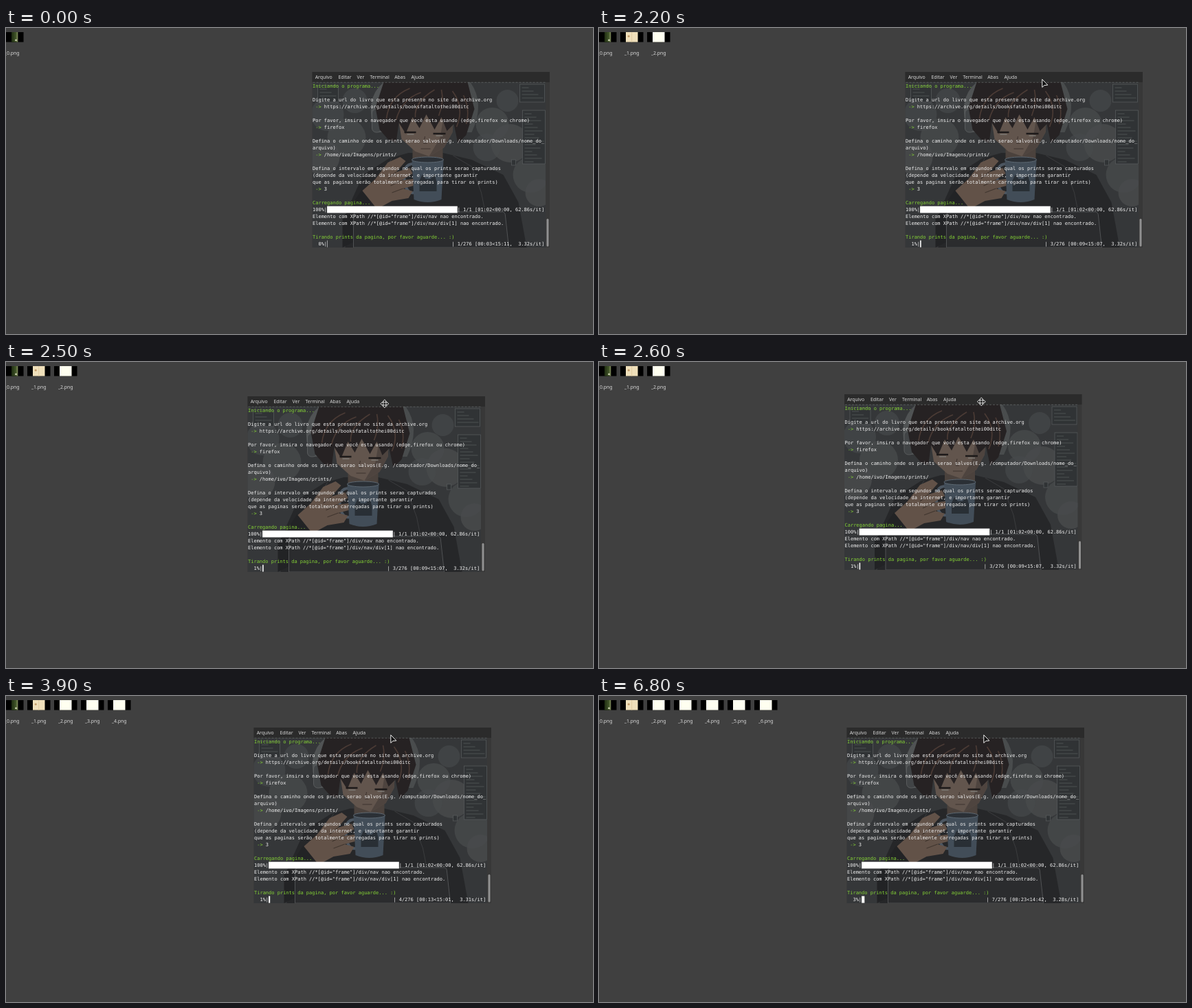
An HTML page that plays this animation: 854x446 px, repeating every 6900 ms.

```html
<!DOCTYPE html>
<html lang="pt">
<head>
<meta charset="utf-8">
<title>Terminal</title>
<style>
html, body { margin: 0; width: 100%; height: 100%; overflow: hidden; background: #404040; }
svg { display: block; width: 854px; height: 446px; }
text { white-space: pre; }
.ui { font: 6.9px "Noto Sans", "Open Sans", sans-serif; fill: #d6d6d6; }
.mono { font: 7px "DejaVu Sans Mono", monospace; fill: #f0f0f0; }
.green { fill: #85d336; }
</style>
</head>
<body>
<svg viewBox="0 0 854 446" xmlns="http://www.w3.org/2000/svg">
  <defs>
    <clipPath id="pane"><rect y="15" width="339.5" height="241"/></clipPath>
    <linearGradient id="cover"><stop stop-color="#1f2d12"/><stop offset=".7" stop-color="#43572a"/><stop offset="1" stop-color="#8a9466"/></linearGradient>
  </defs>
  <rect width="854" height="446" fill="#404040"/>
  <g id="files"></g>
  <g id="win">
    <rect width="345.5" height="256" fill="#383838"/>
    <g clip-path="url(#pane)">
      <rect y="15" width="340" height="241" fill="#353739"/>
      <g id="clouds" fill="#484b4c"></g>
      <g id="panels" fill="#303335" stroke="#55595a" stroke-width=".8"></g>
      <!-- jacket -->
      <path d="M48 256L56 190 74 150 112 126 140 118H190L232 128 278 150 300 190 312 256Z" fill="#262729"/>
      <path d="M205 122L232 138 246 176 262 256M116 126L100 150 88 198" fill="none" stroke="#3b3c3e"/>
      <!-- headphones -->
      <path d="M92 88Q74 40 104 15H116Q92 46 102 88Z" fill="#505354"/>
      <path d="M222 88Q242 46 222 15H230Q252 46 232 88Z" fill="#494c4d"/>
      <rect x="87" y="54" width="14" height="34" rx="6" fill="#414446" stroke="#606364" stroke-width=".8"/>
      <!-- head -->
      <path d="M146 104H190V130L168 140 146 128Z" fill="#4b423d"/>
      <path d="M124 60H206L204 88 192 110 170 123 150 116 130 98Z" fill="#62554d"/>
      <path d="M192 60H206L204 88 192 110 170 123 186 96Z" fill="#4e443f"/>
      <path d="M98 84L92 52 104 15H226L236 54 224 92 212 104 206 76 196 86 188 66 178 84 166 62 156 82 146 66 136 90 126 74 122 104 110 98Z" fill="#262223"/>
      <path d="M108 68Q112 36 142 24M122 70Q130 40 158 30M150 66Q148 44 178 26M184 64Q192 44 188 26M210 80Q222 52 204 28M224 76Q230 54 220 34" fill="none" stroke="#4b3b35" stroke-width="1.6"/>
      <path d="M134 88H151M176 90H194" stroke="#1d1a1a" stroke-width="2.4"/>
      <path d="M138 91H148M180 93H190" stroke="#7d7a74" stroke-width="1.4"/>
      <path d="M164 94L162 104H167M158 112H172" fill="none" stroke="#3c322e"/>
      <!-- mug and hand -->
      <path d="M147 134Q132 134 134 156T148 176" fill="none" stroke="#4c5661" stroke-width="4"/>
      <path d="M145 128H191L188 186Q168 194 148 186Z" fill="#424d58"/>
      <ellipse cx="168" cy="128" rx="23" ry="4" fill="#2b3036" stroke="#5d6872"/>
      <path d="M156 174V158L160 150 165 156H172L178 149 181 160V174Z" fill="#292f35"/>
      <path d="M72 174L92 156 110 132 128 124 136 130 122 146 142 140 146 148 130 158 147 156V166L132 170 146 174 140 184 116 188 94 200 72 196Z" fill="#625248"/>
      <path d="M122 146L110 156M130 158L114 166M132 170L116 176" fill="none" stroke="#40362f" stroke-width="1.2"/>
      <path d="M44 214L72 172 96 202 80 238 44 256Z" fill="#222325"/>
      <!-- laptop -->
      <path d="M60 256V210Q60 204 66 204H276Q281 204 281 210L286 256Z" fill="#2b2c2e" stroke="#505254"/>
    </g>
    <rect width="345.5" height="15" fill="#2b2b2b"/>
    <path d="M1 15.3H339" stroke="#686a6a" stroke-width=".7" stroke-dasharray="3 2"/>
    <rect x="341" y="214" width="3" height="40.5" rx="1.5" fill="#919191"/>
    <g id="menu" class="ui"></g>
    <g id="lines" class="mono"></g>
    <rect x="21.6" y="195.7" width="189.7" height="9.8" fill="#fff"/>
    <rect id="bar" x="21.6" y="245.6" height="10" fill="#fff"/>
  </g>
  <path id="arrow" d="M0 0V11.6L3.2 8.7 8 8.3Z" fill="#0c0c0c" stroke="#f4f4f4" stroke-width="1" stroke-linejoin="round"/>
  <g id="move">
    <path d="M0 -6L2.6 -3H1V-1H3V-2.6L6 0 3 2.6V1H1V3H2.6L0 6 -2.6 3H-1V1H-3V2.6L-6 0 -3 -2.6V-1H-1V-3H-2.6Z" fill="#111" stroke="#f4f4f4" stroke-width=".9"/>
  </g>
</svg>
<script>
const $ = id => document.getElementById(id);
const LOOP = 6900, STEP = 100, COL = 4.214, PAGES = 276;

function add(parent, tag, attrs, text) {
  const el = document.createElementNS("http://www.w3.org/2000/svg", tag);
  for (const k in attrs) el.setAttribute(k, attrs[k]);
  if (text) el.textContent = text;
  parent.appendChild(el);
  return el;
}

// Wallpaper background
[[22, 62, 24], [50, 96, 28], [14, 124, 26], [62, 42, 18], [262, 76, 24], [288, 104, 28],
 [254, 110, 20], [318, 150, 26], [330, 176, 20], [284, 42, 16]].forEach(([cx, cy, r], i) => {
  add($("clouds"), "circle", { cx, cy, r, opacity: 0.65 + 0.1 * (i % 3) });
});
[[306, 56, 33, 78], [302, 18, 36, 26], [8, 20, 30, 24]].forEach(([x, y, width, height]) => {
  add($("panels"), "rect", { x, y, width, height });
  for (let r = 5, i = 0; r < height - 2; r += 5, i++)
    add($("panels"), "path", { d: `M${x + 3} ${y + r}h${10 + (i * 7) % (width - 14)}` });
});
add($("panels"), "rect", { x: 290, y: 128, width: 6, height: 8 });

// Menu
[["Arquivo", 4.2], ["Editar", 38], ["Ver", 65], ["Terminal", 84], ["Abas", 119.7], ["Ajuda", 144]]
  .forEach(([s, x]) => add($("menu"), "text", { x, y: 10 }, s));

// Terminal text: "+" marks a green line, ">" an answer after the prompt arrow
const rows = `+Iniciando o programa...

Digite a url do livro que esta presente no site da archive.org
>https://archive.org/details/booksfataltothei00ditc

Por favor, insira o navegador que você esta usando (edge,firefox ou chrome)
>firefox

Defina o caminho onde os prints serao salvos(E.g. /computador/Downloads/nome_do_
arquivo)
>/home/ivo/Imagens/prints/

Defina o intervalo em segundos no qual os prints serao capturados
(depende da velocidade da internet, e importante garantir
que as paginas serão totalmente carregadas para tirar os prints)
>3

+Carregando pagina...
100%|
Elemento com XPath //*[@id="frame"]/div/nav nao encontrado.
Elemento com XPath //*[@id="frame"]/div/nav/div[1] nao encontrado.

+Tirando prints da pagina, por favor aguarde... :)`.split("\n");

const put = (row, col, s, cls) =>
  add($("lines"), "text", { x: 0.5 + col * COL, y: 22.6 + row * 10, class: cls || "" }, s);

rows.forEach((s, i) => {
  if (s[0] === "+") put(i, 0, s.slice(1), "green");
  else if (s[0] === ">") { put(i, 1, "->", "green"); put(i, 4, s.slice(1)); }
  else if (s) put(i, 0, s);
});
put(18, 50, "| 1/1 [01:02<00:00, 62.86s/it]");
const percent = put(23, 0, " "), stats = put(23, 48, " ");

// Saved pages
const files = Array.from({ length: 7 }, (_, i) => {
  const g = add($("files"), "g", { transform: `translate(${i * 39 - 8} 6)` });
  add(g, "rect", { width: 33.5, height: 14.5, fill: "#000" });
  if (i === 0) {
    add(g, "rect", { x: 16, width: 9.3, height: 14.5, fill: "url(#cover)" });
    add(g, "circle", { cx: 22.5, cy: 11.7, r: 1.3, fill: "#d5d8bd" });
  } else {
    add(g, "rect", { x: 8, width: 17.5, height: 14.5, fill: i === 1 ? "#efdfba" : "#fffff0" });
    if (i === 1) {
      add(g, "circle", { cx: 12.2, cy: 6, r: 1.6, fill: "#c09a68" });
      add(g, "path", { d: "M16.7 0V14.5", stroke: "#dcc69b", "stroke-width": 0.8 });
    }
  }
  add(g, "text", { x: 16.7, y: 32.7, class: "ui", "text-anchor": "middle" }, `_${i}.png`);
  return g;
});

const eta = ["15:11", "15:09", "15:07", "15:01", "14:54", "14:47", "14:42"];
const rate = n => 3.32 - 0.01 * Math.max(0, n - 3);

function windowAt(t) {
  if (t < 2400) return [445.5, 64];
  if (t < 2500) return [395, 57];
  if (t < 2600) return [351.5, 50];
  if (t < 2700) return [357, 47];
  return [360.5, 46];
}

function draw(now) {
  const t = Math.floor((now % LOOP) / STEP) * STEP;
  const [wx, wy] = windowAt(t);
  $("win").setAttribute("transform", `translate(${wx} ${wy})`);

  const saved = 1 + Math.floor((t + 100) / 1000);
  files.forEach((g, i) => g.setAttribute("visibility", i < saved ? "visible" : "hidden"));

  const n = 1 + Math.floor(t / 1000);
  const spent = String(Math.floor(n * 3.32)).padStart(2, "0");
  percent.textContent = `${Math.round(100 * n / PAGES)}%|`.padStart(5);
  stats.textContent = `| ${n}/${PAGES} [00:${spent}<${eta[n - 1]},  ${rate(n).toFixed(2)}s/it]`;
  $("bar").setAttribute("width", Math.floor(n / PAGES * 43 * 8) / 8 * COL);

  // The pointer glides in, then holds the title bar
  const dragging = t >= 2400 && t < 2700;
  const k = 1 - Math.pow(1 - Math.min(1, Math.max(0, (t - 1500) / 600)), 2);
  const px = t < 2200 ? 46 + 598.8 * k : wx + 199.3;
  const py = t < 2200 ? 3 + 71.8 * k : wy + 10.8;
  for (const [id, on] of [["arrow", t >= 1500 && !dragging], ["move", dragging]]) {
    $(id).setAttribute("transform", `translate(${px} ${py})`);
    $(id).setAttribute("visibility", on ? "visible" : "hidden");
  }
}

const start = performance.now();
function tick() {
  draw(performance.now() - start);
  requestAnimationFrame(tick);
}
tick();
</script>
</body>
</html>
```
